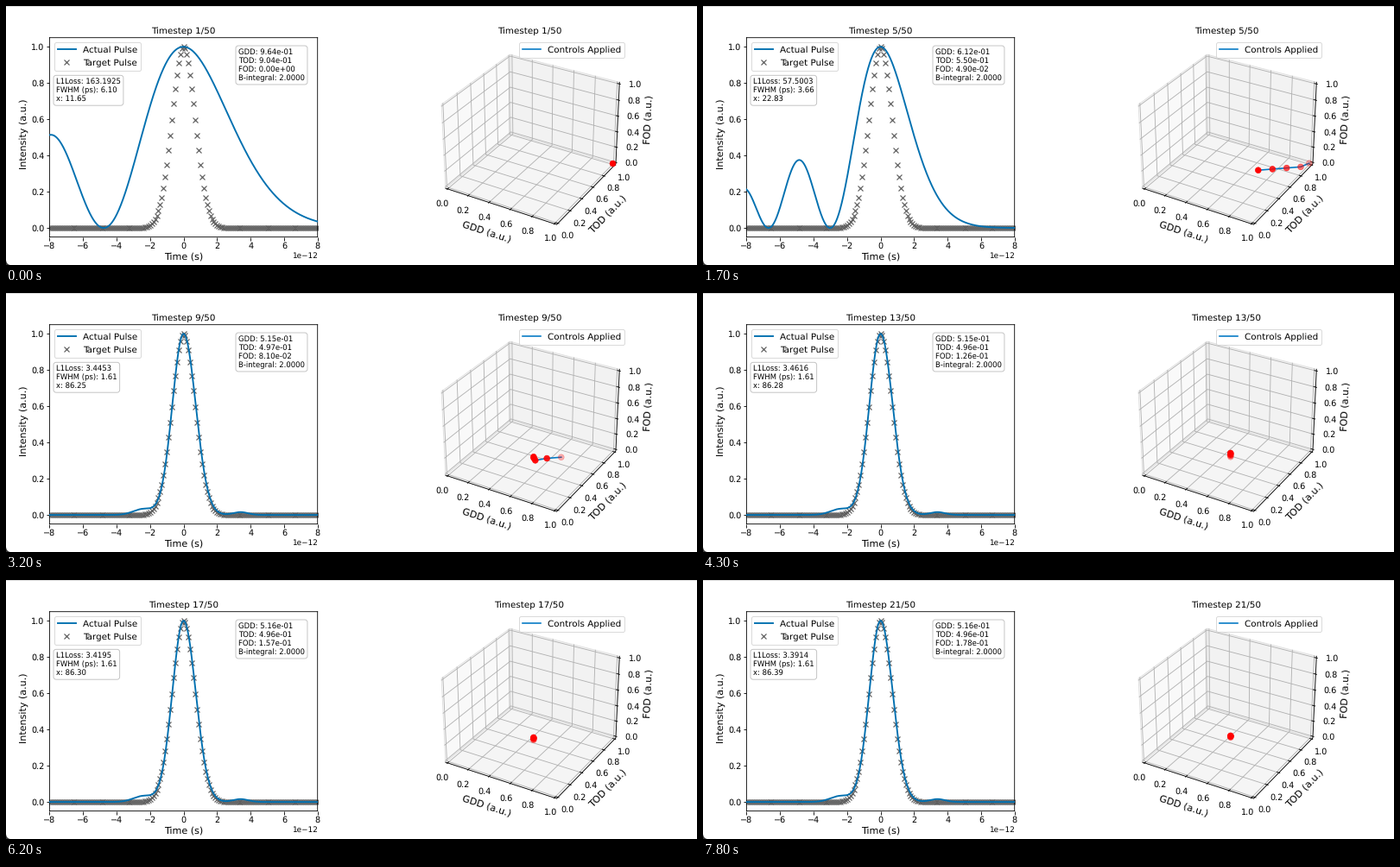
These frames come from a looping animation (800 px wide and 300 px high, 8 s). A matplotlib script:

```python
import numpy as np
import matplotlib.pyplot as plt
from matplotlib.animation import FuncAnimation
from matplotlib.lines import Line2D
from matplotlib.patches import PathPatch, Polygon, Rectangle
from matplotlib.path import Path

W, H, DPI = 800, 300, 100
PX = 72 / DPI                      # points per pixel
FRAMES, INTERVAL = 80, 100
BLUE, BRIGHT, GRAY = "#0170b0", "#0078c4", "#5f5f5f"
TITLE, LABEL, TICK, NOTE = 10.4 * PX, 11.1 * PX, 9.7 * PX, 8.55 * PX
THIN = .85 * PX

SETTLED = 6                        # first step with a compressed pulse
SIGMA = .69                        # target pulse width in ps
TIME = np.linspace(-8, 8, 801)

plt.rcParams["text.hinting"] = "none"


def step_at(frame):
    """A steady pace with one short stall."""
    clock = frame - np.clip(frame - 57, 0, 5.3)
    return max(1, 2 + int(np.floor((clock - 4) / 3.53)))


def settle(n):
    return np.exp(-1.7 * (n - 7))


def controls(n):
    """GDD, TOD and FOD: a straight approach, then a slow climb."""
    n = np.asarray(n, float)
    approach = [1.052 - .088 * n, .9925 - .0885 * n, .01225 * (n - 1)]
    rest = [.514 + .0001 * n + .0035 * settle(n),
            .49705 - .00005 * n - .0006 * settle(n),
            .2225 - .1415 * .682 ** ((n - 9) / 4) - .0005 * settle(n)]
    return np.clip(np.where(n < SETTLED, approach, rest), 0, 1)


def fwhm(n):
    return 6.1 - .61 * (n - 1) if n < SETTLED else 1.61 + .08 * settle(n)


def scores(n):
    """Loss and quality figure."""
    if n < SETTLED:
        return 189.61555 - 26.42305 * n, 11.65 * 1.1832 ** (n - 1)
    keys = [6, 7, 9, 13, 17, 21]
    return (np.interp(n, keys, [9.8624, 4.1916, 3.4453, 3.4616, 3.4195, 3.3914]),
            np.interp(n, keys, [68.71, 84.08, 86.25, 86.28, 86.30, 86.39]))


def gauss(t, centre, width):
    return np.exp(-((t - centre) / width) ** 2 / 2)


def stretched_pulse(scale):
    """Gaussian spectrum with a cubic phase, peak moved to zero."""
    k = (np.arange(3000) + .5) * 5 / 3000
    t = np.linspace(-14, 14, 1121)
    phase = (scale * k) ** 3 / 3 + np.outer(t, k)
    power = (np.cos(phase) @ np.exp(-(SIGMA * k) ** 2)) ** 2
    peak = power.argmax()
    return np.interp(TIME + t[peak], t, power / power[peak])


def compressed_pulse(n):
    right = .725 + .05 * settle(n)
    main = gauss(TIME, 0, np.where(TIME < 0, .67, right))
    side = -2.4 - .22 * settle(n)
    return main + .033 * gauss(TIME, side, .6) + .016 * gauss(TIME, 3.4, .45)


def pulse(n):
    return stretched_pulse(.574 * fwhm(n)) if n < SETTLED else compressed_pulse(n)


def project(points):
    """Unit cube to stage pixels, plus nearness to the viewer."""
    d = (np.asarray(points, float) - .5) * [1.1429, 1.1429, .8571]
    near = d @ [.4330, -.75, .5]
    x = d @ [.8660, .5, 0] / (10 - near)
    y = d @ [-.25, .4330, .8660] / (10 - near)
    return np.column_stack([609.2 + 1239 * x, 149.9 - 1239 * y]), near


fig = plt.figure(figsize=(W / DPI, H / DPI), dpi=DPI, facecolor="white")


def pixel_axes(left, top, right, bottom):
    ax = fig.add_axes([left / W, 1 - bottom / H,
                       (right - left) / W, (bottom - top) / H])
    ax.set(xlim=(left, right), ylim=(bottom, top))
    return ax


def label(ax, x, y, text, size, angle=0, ha="center", va="center"):
    return ax.text(x, y, text, fontsize=size, rotation=angle, ha=ha, va=va)


def note(x, y):
    frame = dict(boxstyle="round,pad=0.35", facecolor="white",
                 edgecolor="#c0c0c0", linewidth=.9 * PX)
    return stage.text(x, y, "", fontsize=NOTE, va="top", bbox=frame, zorder=6)


# Pulse plot
plot = pixel_axes(50.4, 36.7, 360.7, 267.6)
plot.set(xlim=(-8, 8), ylim=(-.05, 1.05), xticks=range(-8, 9, 2))
plot.set_yticks(np.arange(6) / 5)
plot.tick_params(labelsize=TICK, length=3.5 * PX, pad=2.5 * PX, width=THIN)
for spine in plot.spines.values():
    spine.set(linewidth=THIN, snap=False)
curve, = plot.plot(TIME, TIME * 0, color=BLUE, lw=1.9 * PX, zorder=3,
                   label="Actual Pulse")
samples = np.linspace(-8, 8, 161)
plot.plot(samples, gauss(samples, 0, SIGMA), "x", color=GRAY, ms=6 * PX,
          mew=1.2 * PX, zorder=2, label="Target Pulse")
plot.legend(loc="upper left", fontsize=TITLE).get_frame().set_linewidth(.9 * PX)

# Stage-wide texts and the window edge
stage = pixel_axes(0, 0, W, H)
stage.axis("off")
stage.add_patch(Rectangle((0, 0), W, 1, color="#dcdcdc", lw=0))
corner = Path([(0, 294), (.5, 299.5), (5, 300), (0, 300), (0, 294)],
              [Path.MOVETO, Path.CURVE3, Path.CURVE3, Path.LINETO,
               Path.CLOSEPOLY])
stage.add_patch(PathPatch(corner, color="#333333", lw=0))
label(stage, 205.5, 291, "Time (s)", LABEL)
label(stage, 20.7, 148.5, "Intensity (a.u.)", LABEL, 90)
label(stage, 361, 289, "1e\N{MINUS SIGN}12", .92 * TICK, ha="right")
titles = [label(stage, x, 31.7, "", TITLE, va="baseline")
          for x in (205.5, 606)]
fit_note = note(58, 83.3)
control_note = note(269, 49)

# Control space
space = pixel_axes(490.5, 37, 721.5, 268)
space.axis("off")
LO, HI = -1 / 48, 49 / 48


def stroke(points, color, z):
    xy, _ = project(points)
    space.plot(*xy.T, color=color, lw=THIN, zorder=z, clip_on=False)


def pane(points, shade):
    xy, _ = project(points)
    space.add_patch(Polygon(xy, facecolor=str(shade), edgecolor=".88",
                            lw=.9 * PX, zorder=1, clip_on=False))


pane([(LO, LO, LO), (LO, HI, LO), (LO, HI, HI), (LO, LO, HI)], .975)
pane([(LO, HI, LO), (HI, HI, LO), (HI, HI, HI), (LO, HI, HI)], .95)
pane([(LO, LO, LO), (HI, LO, LO), (HI, HI, LO), (LO, HI, LO)], .9625)

OUT, IN = .0087, .0174
for v in np.arange(6) / 5:
    stroke([(v, LO, LO), (v, HI, LO), (v, HI, HI)], "#b0b0b0", 2)
    stroke([(HI, v, LO), (LO, v, LO), (LO, v, HI)], "#b0b0b0", 2)
    stroke([(LO, LO, v), (LO, HI, v), (HI, HI, v)], "#b0b0b0", 2)
    ticks = [((v, LO, LO), (0, -1, 0), (-6 + 1.5 * v, 17.3)),
             ((HI, v, LO), (1, 0, 0), (10.5, 14.5)),
             ((HI, HI, v), (1, 0, 0), (18, 1))]
    for base, way, shift in ticks:
        base, way = np.array(base), np.array(way)
        stroke([base + OUT * way, base - IN * way], "black", 3)
        x, y = project([base])[0][0] + shift
        label(space, x, y, f"{v:.1f}", TICK)

stroke([(LO, LO, LO), (HI, LO, LO), (HI, HI, LO), (HI, HI, HI)], "black", 3)
label(space, 556.5, 261.5, "GDD (a.u.)", LABEL, -18)
label(space, 696.5, 241, "TOD (a.u.)", LABEL, 45.8)
label(space, 743.5, 131, "FOD (a.u.)", LABEL, 87.4)

trail, = space.plot([], [], color=BRIGHT, lw=1.6 * PX, zorder=4)
dots = space.scatter([], [], s=(6.8 * PX) ** 2, linewidths=.6 * PX, zorder=5)
key = Line2D([], [], color=BRIGHT, lw=1.6 * PX, label="Controls Applied")
space.legend(handles=[key], loc="upper right",
             fontsize=TITLE).get_frame().set_linewidth(.9 * PX)

PULSES = {n: pulse(n) for n in range(1, step_at(FRAMES - 1) + 1)}


def show_controls(step):
    """Last five controls before this step, fainter when farther away."""
    past = np.arange(max(step - 5, 0), step)
    xy, near = project(controls(past).T * np.where(past > 0, 1, [[1], [1], [0]]).T)
    trail.set_data(*xy.T)
    span = np.ptp(near)
    alpha = .3 + .7 * (near - near.min()) / span if span else np.ones(1)
    order = np.argsort(near)
    colors = [(1, 0, 0, a) for a in alpha[order]]
    dots.set_offsets(xy[order])
    dots.set_facecolor(colors)
    dots.set_edgecolor(colors)


def update(frame):
    step = step_at(frame)
    loss, quality = scores(step)
    gdd, tod, fod = controls(step)
    for title in titles:
        title.set_text(f"Timestep {step}/50")
    curve.set_ydata(PULSES[step])
    fit_note.set_text(f"L1Loss: {loss:.4f}\n"
                      f"FWHM (ps): {fwhm(step):.2f}\n"
                      f"x: {quality:.2f}")
    control_note.set_text(f"GDD: {gdd:.2e}\nTOD: {tod:.2e}\n"
                          f"FOD: {fod:.2e}\nB-integral: 2.0000")
    show_controls(step)
    return [curve, trail, dots, fit_note, control_note, *titles]


anim = FuncAnimation(fig, update, frames=FRAMES, interval=INTERVAL,
                     repeat=True, repeat_delay=0)
plt.show()
```
